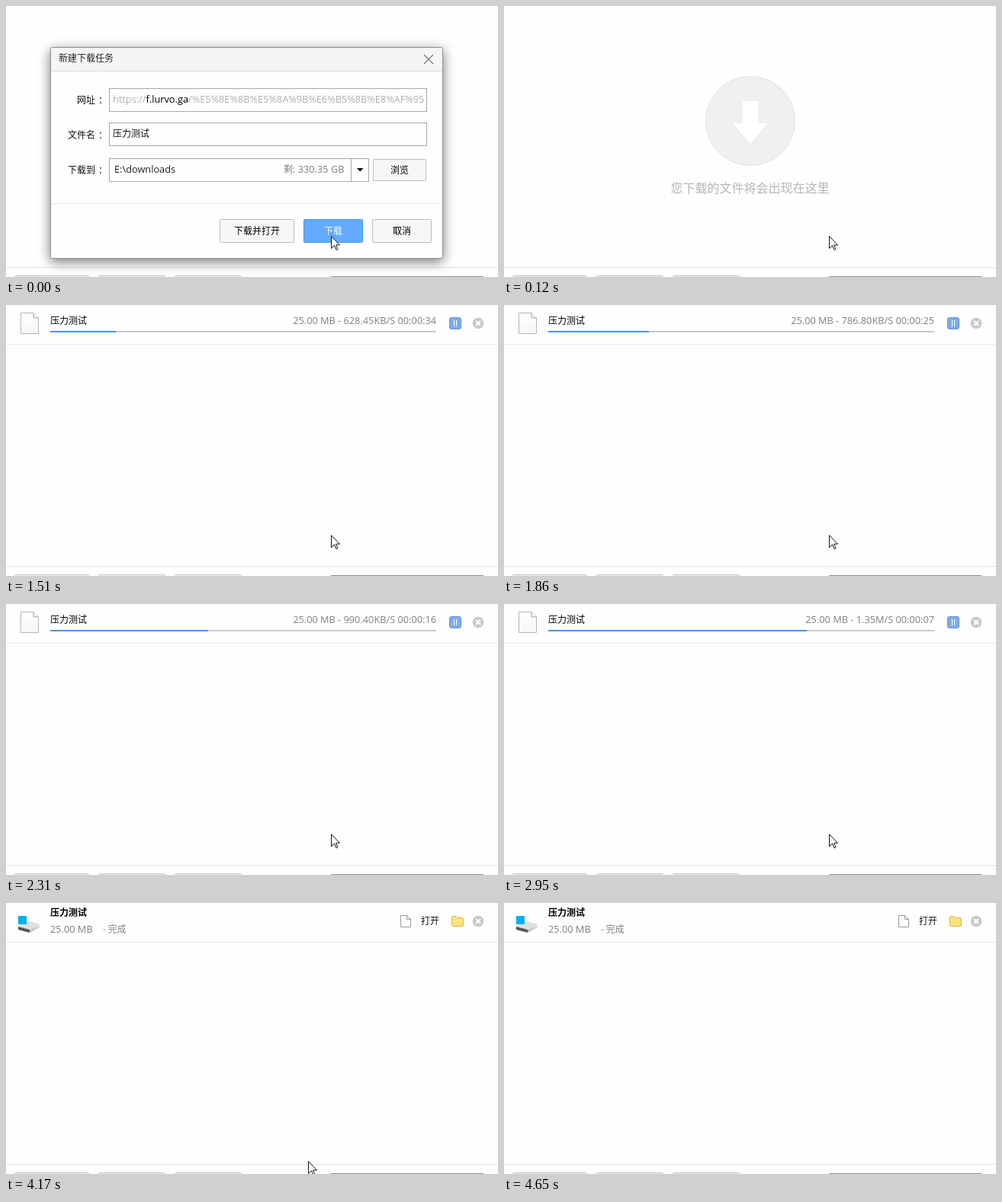
Animation, 645 px wide and 356 px high, one loop 4.77 s. Source, as an HTML page:

```html
<!DOCTYPE html>
<html lang="zh-CN">
<head>
<meta charset="utf-8">
<style>
  html, body { margin: 0; width: 645px; height: 356px; overflow: hidden; background: #fefefe; }
  svg { display: block; }
  text { font: 12px 'Noto Sans CJK SC', 'Noto Sans CJK', sans-serif; fill: #111; }
  .latin { font: 12.76px 'Open Sans', 'Noto Sans', sans-serif; }
  .grey { fill: #808080; }
  .mid { text-anchor: middle; }
  .mid text { font-weight: 500; fill: #000; }
  .end { text-anchor: end; }
  .field { fill: #fefefe; stroke: #a9a9a9; }
  .button { fill: #f6f6f6; stroke: #bcbcbc; }
  #dialog { filter: drop-shadow(0 4px 8px #0008); }
</style>
</head>
<body>
<svg width="645" height="356" viewBox="0 0 645 356">
  <defs>
    <linearGradient id="paper" x2="0" y2="1">
      <stop stop-color="#fff"/><stop offset="1" stop-color="#f6f6f6"/>
    </linearGradient>
    <linearGradient id="metal" x2="0" y2="1">
      <stop stop-color="#e9e9e9"/><stop offset="1" stop-color="#b5b5b5"/>
    </linearGradient>
  </defs>

  <g id="empty">
    <circle cx="323" cy="151" r="58.5" fill="#f0f0f0" stroke="#e3e3e3"/>
    <path d="M313 125H333V154H347L323 182L299 154H313Z" fill="#fff"/>
    <path d="M299 154L323 182L347 154" fill="none" stroke="#e4e4e4"/>
    <text class="mid" x="322.5" y="245" style="font-size:16px;fill:#b5b5b5">您下载的文件将会出现在这里</text>
  </g>

  <g id="item">
    <path d="M0 51.5H645" stroke="#e9e9e9"/>
    <g id="loading">
      <path d="M19.5 10.5H36L42.5 17V37.5H19.5Z" fill="url(#paper)" stroke="#b5b5b5"/>
      <path d="M36 10.5V17H42.5" fill="#f2f2f2" stroke="#a5a5a5"/>
      <text x="58" y="25" style="font-weight:500;fill:#000">压力测试</text>
      <text id="status" class="latin grey end" x="564" y="25"/>
      <rect x="58" y="34" width="506" height="2" fill="#cbcbcb"/>
      <rect id="bar" x="58" y="34" height="2" fill="#4b96ea"/>
      <rect x="581.5" y="16.5" width="15" height="15" rx="2.5" fill="#7eace8" stroke="#6297dc"/>
      <path d="M587.5 20V28M590.5 20V28" stroke="#fff"/>
    </g>
    <g id="done">
      <path d="M16 31L27 23L44 28L31 35Z" fill="#dedede"/>
      <path d="M16 31L31 35V39L16 35Z" fill="#555"/>
      <path d="M31 35L44 28V32L31 39Z" fill="url(#metal)"/>
      <rect x="16" y="17" width="11" height="11" fill="#00b0ee"/>
      <text x="58" y="17" style="font-weight:700;fill:#000">压力测试</text>
      <text class="latin grey" x="58" y="39">25.00 MB</text>
      <text class="grey" x="127" y="39">- 完成</text>
      <path d="M517.5 16.5H525.5L530.5 21.5V31.5H517.5ZM525.5 16.5V21.5H530.5" fill="#fff" stroke="#999"/>
      <text x="544" y="28">打开</text>
      <path d="M584.5 19Q584.5 17.5 586 17.5H590L592 19.5H598Q599.5 19.5 599.5 21V29Q599.5 30.5 598 30.5H586Q584.5 30.5 584.5 29Z" fill="#ffe27c" stroke="#dcb548"/>
    </g>
    <circle cx="619" cy="24" r="7.3" fill="#c9c9c9"/>
    <path d="M616 21L622 27M622 21L616 27" stroke="#fff" stroke-width="2"/>
  </g>

  <path d="M0 343.5H645" stroke="#e2e2e2"/>
  <g class="button">
    <rect x="11.5" y="354.5" width="97" height="20" rx="1"/>
    <rect x="121.5" y="354.5" width="87" height="20" rx="1"/>
    <rect x="221.5" y="354.5" width="87" height="20" rx="1"/>
  </g>
  <path d="M426 355.5H626" stroke="#8c8c8c"/>

  <g id="dialog">
    <rect x="58.5" y="54.5" width="514" height="277" rx="2" fill="#fefefe" stroke="#8f8f8f"/>
    <path d="M59 85V56Q59 55 60 55H571Q572 55 572 56V85Z" fill="#f5f5f5"/>
    <path d="M59 85.5H572" stroke="#dcdcdc"/>
    <path d="M59 259.5H572" stroke="#e6e6e6"/>
    <text x="69" y="73" style="fill:#222">新建下载任务</text>
    <path d="M548 64L560 76M560 64L548 76" stroke="#777" stroke-width="1.2"/>
    <text x="93" y="128">网址<tspan dx="4">：</tspan></text>
    <text x="81" y="174">文件名<tspan dx="4">：</tspan></text>
    <text x="81" y="220">下载到<tspan dx="4">：</tspan></text>
    <g class="field">
      <rect x="135.5" y="108.5" width="416" height="30"/>
      <rect x="135.5" y="153.5" width="416" height="30"/>
      <rect x="135.5" y="200.5" width="340" height="30"/>
      <path d="M452.5 200V231"/>
    </g>
    <text class="latin" x="140" y="127" style="fill:#b0b0b0">https://<tspan fill="#000">f.lurvo.ga</tspan>/%E5%8E%8B%E5%8A%9B%E6%B5%8B%E8%AF%95</text>
    <text x="140" y="172">压力测试</text>
    <text class="latin" x="142" y="219" style="fill:#222">E:\downloads</text>
    <text x="364" y="219" class="grey">剩<tspan class="latin">: 330.35 GB</tspan></text>
    <path d="M460 213H468.5L464.2 217.5Z"/>
    <g class="button">
      <rect x="481.5" y="201.5" width="69" height="28" rx="1"/>
      <rect x="280.5" y="280.5" width="97" height="30" rx="1"/>
      <rect x="480.5" y="280.5" width="77" height="30" rx="1"/>
    </g>
    <rect x="390.5" y="280.5" width="77" height="30" rx="1" fill="#62abff" stroke="#4a94e8"/>
    <g class="mid">
      <text x="516" y="220">浏览</text>
      <text x="329" y="300">下载并打开</text>
      <text x="429" y="300" style="fill:#fff">下载</text>
      <text x="519" y="300">取消</text>
    </g>
  </g>

  <path id="cursor" d="M.5 .5V16.5L4.5 12.7L7 18.5L9 17.5L6.6 12H11.5Z" fill="#fff" stroke="#101020"/>
</svg>
<script>
const LOOP = 4770;
const $ = id => document.getElementById(id);

// The screen refreshes in bursts: [first, last, steps]
const bursts = [[0, 0, 1], [90, 120, 2], [310, 790, 6], [880, 1340, 6], [1420, 1860, 6],
  [1950, 2400, 6], [2490, 2950, 6], [3040, 3540, 7], [3640, 4070, 6], [4170, 4650, 6]];
const ticks = bursts.flatMap(([a, b, n]) =>
  Array.from({ length: n }, (_, i) => Math.round((a + (b - a) * i / Math.max(1, n - 1)) / 10) * 10));

// Points are [time, value]
const barEnd = [[310, 58], [550, 65], [790, 78], [1340, 124], [1510, 144], [1860, 190],
  [2310, 265], [2400, 281], [2950, 397], [3540, 513], [3850, 564]];
const speeds = [[310, 100], [790, 362.4], [1510, 628.45], [2310, 990.4], [3540, 1751], [3850, 1870]];
const cursorX = [[3290, 426], [3540, 410], [4070, 399], [4440, 388]];
const cursorY = [[3290, 302], [3540, 316], [4070, 330], [4440, 362]];

function at(points, t) {
  const i = points.findIndex(p => p[0] >= t);
  if (i < 0) return points[points.length - 1][1];
  if (i === 0) return points[0][1];
  const [t0, a] = points[i - 1], [t1, b] = points[i];
  return a + (b - a) * (t - t0) / (t1 - t0);
}

const show = (id, on) => $(id).style.display = on ? '' : 'none';
const pad = n => String(n).padStart(2, '0');

function status(end, speed) {
  const rate = speed < 1024 ? speed.toFixed(2) + 'KB/S' : (speed / 1024).toFixed(2) + 'M/S';
  const left = Math.ceil((564 - end) / 506 * 25 * 1024 / speed);
  return `25.00 MB - ${rate} 00:${pad(Math.floor(left / 60))}:${pad(left % 60)}`;
}

function draw(now) {
  const time = now % LOOP;
  const t = ticks.filter(k => k <= time).pop();
  const end = Math.round(at(barEnd, t));
  show('dialog', t < 120);
  $('dialog').style.opacity = t < 90 ? 1 : 0.4;
  show('empty', t < 310);
  show('item', t >= 310);
  show('loading', t < 4170);
  show('done', t >= 4170);
  $('bar').setAttribute('width', end - 58);
  $('status').textContent = status(end, at(speeds, t));
  $('cursor').setAttribute('transform',
    `translate(${Math.round(at(cursorX, t))} ${Math.round(at(cursorY, t))})`);
}

const start = performance.now();
function loop() {
  draw(performance.now() - start);
  requestAnimationFrame(loop);
}
loop();
</script>
</body>
</html>
```
